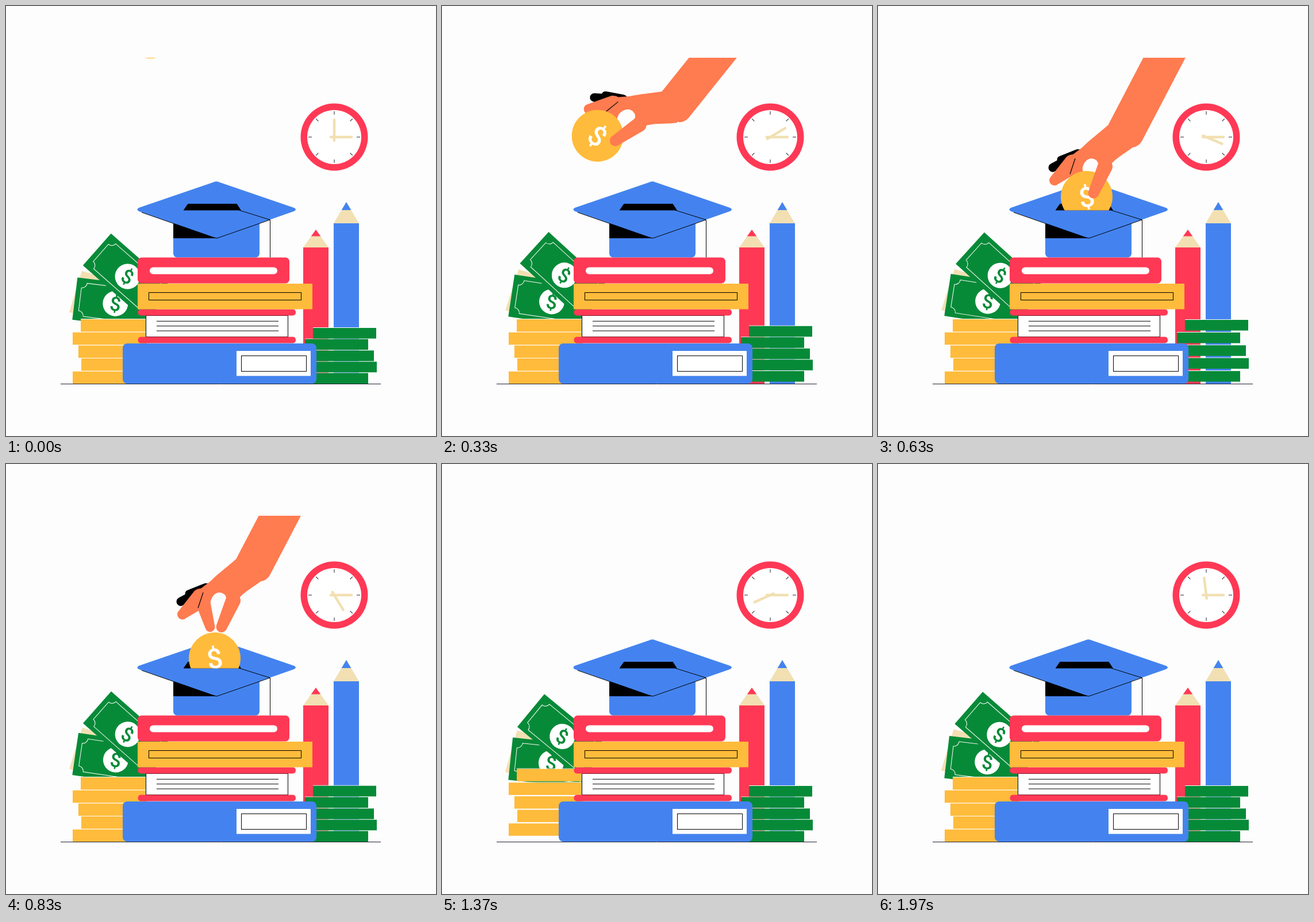
An HTML page with a canvas that plays this animation: 748 px wide and 748 px high, repeating every 2.01 s.

```html
<!DOCTYPE html>
<html lang="en">
<head>
<meta charset="utf-8">
<title>Saving for study</title>
<style>
html, body { margin: 0; width: 100%; height: 100%; overflow: hidden; background: #fdfdfd; }
canvas { display: block; width: 748px; height: 748px; }
</style>
</head>
<body>
<canvas id="stage" width="748" height="748"></canvas>
<script>
const LOOP = 2010, SIZE = 748, HORIZON = 90, SLOT = 355.5;
const BG = '#fdfdfd', RED = '#ff3955', BLUE = '#4483ef', GOLD = '#ffbb3b', GREEN = '#078a38',
  SKIN = '#ff7b50', WOOD = '#f2e0b2', INK = '#000', WHITE = '#fff';
const c = document.getElementById('stage').getContext('2d');
const RAD = Math.PI / 180;

const clamp = v => Math.max(0, Math.min(1, v));
const ramp = (t, from, to) => clamp((t - from) / (to - from));
const smooth = (t, from, to) => (1 - Math.cos(Math.PI * ramp(t, from, to))) / 2;
const mix = (a, b, k) => a + (b - a) * k;

// Smooth bump: 1 at mid, 0 beyond half
const hump = (t, mid, half) => Math.cos(clamp(Math.abs(t - mid) / half) * Math.PI / 2) ** 2;

function at(x, y, deg, draw) {
  c.save();
  c.translate(x, y);
  c.rotate(deg * RAD);
  draw();
  c.restore();
}
function clipped(bottom, draw) {
  c.save();
  c.beginPath();
  c.rect(0, HORIZON, SIZE, bottom - HORIZON);
  c.clip();
  draw();
  c.restore();
}
function box(color, x, y, w, h, r = 0) {
  c.fillStyle = color;
  c.beginPath();
  c.roundRect(x, y, w, h, r);
  c.fill();
}
function frame(x, y, w, h) {
  c.strokeStyle = INK;
  c.lineWidth = 1;
  c.strokeRect(x, y, w, h);
}
function disc(color, x, y, r) {
  c.fillStyle = color;
  c.beginPath();
  c.arc(x, y, r, 0, 7);
  c.fill();
}
// Tapered limb with round ends
function limb(color, x, y, r, x2, y2, r2) {
  const a = Math.atan2(y2 - y, x2 - x), q = Math.PI / 2;
  c.fillStyle = color;
  c.beginPath();
  c.arc(x, y, r, a + q, a + 3 * q);
  c.arc(x2, y2, r2, a - q, a + q);
  c.fill();
}
function shape(color, d) {
  c.fillStyle = color;
  c.fill(new Path2D(d));
}
function line(color, width, d) {
  c.strokeStyle = color;
  c.lineWidth = width;
  c.stroke(new Path2D(d));
}
function dollar(color, size) {
  c.fillStyle = color;
  c.font = `500 ${size}px Roboto, Arial, sans-serif`;
  c.textAlign = 'center';
  const m = c.measureText('$');
  c.fillText('$', 0, (m.actualBoundingBoxAscent - m.actualBoundingBoxDescent) / 2);
}

function clock(t) {
  disc(RED, 571, 228, 58.5);
  disc(WHITE, 571, 228, 47);
  for (let i = 0; i < 8; i++) at(571, 228, i * 45, () => line('#223', 1, 'M0 -39 V-45'));
  c.lineCap = 'round';
  for (const turn of [90, 360 * t / LOOP])
    at(571, 228, turn, () => line(WOOD, 4.5, 'M0 6 V-30'));
  c.lineCap = 'butt';
}

// Banknote with its left edge centred on the origin
function note(tilt) {
  box(GREEN, 0, -37, 142, 74);
  line(WHITE, 1, 'M9 -20 A9 9 0 0 0 18 -29 H124 A9 9 0 0 0 133 -20 V20 A9 9 0 0 0 124 29 H18 A9 9 0 0 0 9 20 Z');
  disc(WHITE, 71, 0, 22);
  at(71, 0, tilt, () => dollar(GREEN, 34));
}
// Rock gently about a point hidden behind the books
function sway(t, peak, deg, draw) {
  at(322, 543, deg * Math.cos(2 * Math.PI * (t - peak) / LOOP), () => {
    c.translate(-322, -543);
    draw();
  });
}
function notes(t) {
  sway(t, 520, 1, () => at(121, 496.5, 17, () => box(WOOD, 0, -37.5, 90, 75)));
  sway(t, 560, 1.6, () => at(120, 508, 7.3, () => note(0)));
  sway(t, 430, 1.5, () => at(157.5, 424.5, 41, () => note(-14)));
}

// Five slabs with repeating uneven offsets, bottom first
function stack(color, x, floor, w, h, pitch, lift) {
  for (let i = 0; i < 5; i++) {
    const left = x + (i % 3 ? 15 - 5 * (i % 3 - 1) - (i === 4 ? 1 : 0) : 0);
    const y = floor - h - pitch * i - lift(i);
    box(BG, left, y - 1, w, 1);
    box(color, left, y, w, h);
  }
}
function coinStack(t) {
  const h = hump(t, 1370, 490);
  c.save();
  c.beginPath();
  c.rect(0, 0, 245, SIZE);
  c.clip();
  stack(GOLD, 116, 657.3, 140, 21.5, 22.7, i => h * (10.5 + i * h));
  c.restore();
}
function greenStack(t) {
  stack(GREEN, 520, 657, 110, 18.5, 19.65, i => {
    const k = (i / 4) ** .8;
    return (10 + 7 * k) * hump(t, 480 + 65 * k, 250 + 50 * k);
  });
}

function pencil(color, x, tip, lead, neck) {
  const k = 22 * (lead - tip) / (neck - tip);
  box(color, x - 22, neck, 44, 657 - neck);
  shape(WOOD, `M${x} ${tip} L${x + 22} ${neck} H${x - 22} Z`);
  shape(color, `M${x} ${tip} L${x + k} ${lead} H${x - k} Z`);
}

function books() {
  box(BLUE, 203, 587, 337, 70, 8);
  box(WHITE, 401, 600, 129, 43.5);
  frame(409.5, 608.5, 113, 27);

  box(WHITE, 243, 538, 248, 38);
  frame(243.5, 538.5, 247, 37);
  for (let i = 0; i < 3; i++) line(INK, 1, `M262 ${548.3 + 8.4 * i} H474`);
  for (const y of [527.5, 575.5]) box(RED, 229.5, y, 274.5, 11, 5);

  box(GOLD, 229, 483, 304, 44.5);
  frame(248.5, 498.5, 265, 13);

  box(RED, 229, 437.5, 264, 45, 7);
  box(WHITE, 250, 454.5, 222, 12, 6);
}

function cap(t) {
  const s = hump(t, 1060, 150);
  c.save();
  c.translate(366, 570);
  c.scale(1 + .018 * s, 1 - .03 * s);
  c.translate(-366, -570);
  box(BLUE, 291, 360, 150, 77.5, [0, 0, 7, 7]);
  box(INK, 291, 360, 75, 44);
  shape(BLUE, 'M361 306.5 Q366 304 371 306.5 L501 351 Q507 354 501 357 L371 402.5 Q366 404.5 361 402.5 L231 357 Q226 354 231 351 Z');
  line(INK, 1, 'M236 359 L361 402.5 L366 404 L371 402.5 L459 372');
  shape(INK, 'M316.5 344 H401.5 L409 355.5 H308.5 Z');
  line(INK, 1, 'M405 355 L459.5 372 V437.5');
  c.restore();
}

// Reach down while swinging to vertical, then pull away ever faster
function arm(t) {
  const swing = smooth(t, 215, 580), open = smooth(t, 830, 1070);
  const reach = 1 - (1 - ramp(t, 0, 570)) ** 1.68;
  const rise = Math.max(0, (t - 600) / 470) ** 2;
  return {
    swing, open,
    x: mix(394, 429, swing) + 4 * open,
    y: mix(22, 223, reach) - 176 * rise,
    turn: 42 * (1 - swing) + 20 * open,
    lift: mix(48, 62.4, swing)
  };
}

function fingers(a) {
  limb(INK, -82, 34, 7, -111, 45, 6.5);
  limb(INK, -80, 35, 8, -125, 59, 7.5);
  limb(SKIN, -90, 53, 17, -122, 81, 9);
  at(-87, 58, 62 * a.open, () => limb(SKIN, 0, 0, 13, 13, 45, 8.5));
  shape(SKIN, 'M-29 -15 C-46 0 -60 10 -74 24 L-90 36 L-100 62 L-74 62 Q-70 43 -57 43 Q-44 45 -46 58 L-30 68 L-22 51 C-8 37 6 31 20 19 L24 0 Z');
  line(INK, 1.2, 'M-86 43 L-95 70');
}

function coin(t, a) {
  if (t > 970) return;
  const s = a.swing, gripX = mix(-90, -66, s), gripY = mix(113, 109, s);
  const r = a.turn * RAD, held = t < 600;
  const x = held ? a.x + gripX * Math.cos(r) - gripY * Math.sin(r) : 363;
  const y = held ? a.y + gripX * Math.sin(r) + gripY * Math.cos(r)
    : 332 + 6 * smooth(t, 630, 830) + 75 * ramp(t, 835, 955) ** 2;
  clipped(SLOT, () => at(x, y, 52 * (1 - s) - 10 * s, () => {
    disc(GOLD, 0, 0, 45);
    dollar(WHITE, 48);
  }));
}

function handAndCoin(t) {
  if (t > 1250) return;
  const a = arm(t);
  clipped(SIZE, () => {
    at(a.x, a.y, a.turn, () => fingers(a));
    at(a.x, a.y, -a.lift, () => shape(SKIN, 'M0 -32.5 H420 V32.5 H3 Q-8 32 -14 24 Z'));
  });
  coin(t, a);
  clipped(SIZE, () => at(a.x, a.y, a.turn, () => limb(SKIN, -34, 57, 13, -54, 103, 9.5)));
}

function draw(now) {
  const t = now % LOOP;
  box(BG, 0, 0, SIZE, SIZE);
  clock(t);
  pencil(RED, 539, 389, 400.5, 420);
  pencil(BLUE, 592, 341, 355, 378);
  greenStack(t);
  notes(t);
  coinStack(t);
  cap(t);
  books();
  line('#223', 1, 'M95 657.5 H652');
  handAndCoin(t);
}

const start = performance.now();
function tick() {
  draw(performance.now() - start);
  requestAnimationFrame(tick);
}
tick();
</script>
</body>
</html>
```
